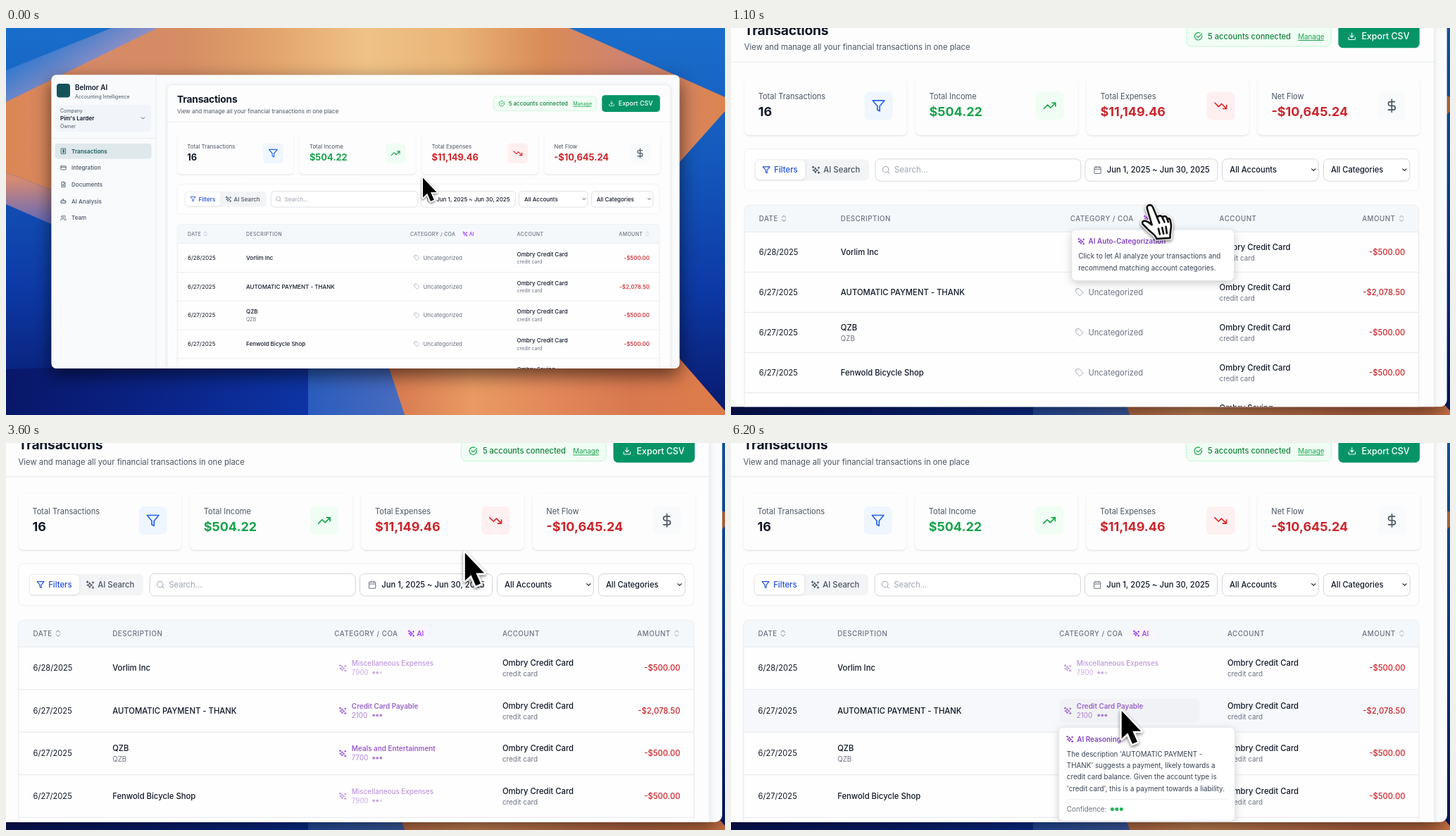
An HTML page with a canvas for the animation above (6.3 s loop, 1021x549 px).

```html
<!DOCTYPE html>
<html lang="en">
<head>
<meta charset="utf-8">
<title>Transactions demo</title>
<style>
html, body { margin: 0; width: 100%; height: 100%; overflow: hidden; background: #0d3fa0; }
canvas { display: block; width: 1021px; height: 549px; }
</style>
</head>
<body>
<canvas id="stage" width="1021" height="549"></canvas>
<script>
const W = 1021, H = 549, LOOP = 6300;
const ctx = document.getElementById('stage').getContext('2d');

const INK = '#111827', MUTED = '#6b7280', LINE = '#e5e7eb', RED = '#c9252b', GREEN = '#16a34a', PURPLE = '#9333ea';

// Icons on a 24-unit grid
const ICON = {
  filter: 'M22 3H2l8 9.5V19l4 2v-8.5z',
  up: 'M22 7l-8.5 8.5-5-5L2 17M16 7h6v6',
  down: 'M22 17l-8.5-8.5-5 5L2 7M16 17h6v-6',
  dollar: 'M12 1v22M17 5H9.5a3.5 3.5 0 0 0 0 7h5a3.5 3.5 0 0 1 0 7H6',
  spark: 'M10 6l2 5 5 2-5 2-2 5-2-5-5-2 5-2zM4 2v5M1.5 4.5h5M19 4v4M17 6h4M19 17v5M16.5 19.5h5',
  search: 'M3 11a8 8 0 1 0 16 0a8 8 0 1 0-16 0M21 21l-4.3-4.3',
  calendar: 'M5 4h14a2 2 0 0 1 2 2v14a2 2 0 0 1-2 2H5a2 2 0 0 1-2-2V6a2 2 0 0 1 2-2zM16 2v4M8 2v4M3 10h18',
  tag: 'M12.6 2.6A2 2 0 0 0 11.2 2H4a2 2 0 0 0-2 2v7.2a2 2 0 0 0 .6 1.4l8.7 8.7a2.4 2.4 0 0 0 3.4 0l6.6-6.6a2.4 2.4 0 0 0 0-3.4zM7.5 7.5h.1',
  sort: 'M6 15l6 6 6-6M6 9l6-6 6 6',
  chevron: 'M5 8l7 7 7-7',
  check: 'M21.8 10A10 10 0 1 1 17 3.3M8 11l4 4L22 5',
  download: 'M21 15v4a2 2 0 0 1-2 2H5a2 2 0 0 1-2-2v-4M7 10l5 5 5-5M12 15V3',
  ledger: 'M4 2h16v20H4zM15 8h-5v4h5v4H9M12 6v12',
  card: 'M3 5h18a1 1 0 0 1 1 1v12a1 1 0 0 1-1 1H3a1 1 0 0 1-1-1V6a1 1 0 0 1 1-1zM2 10h20',
  file: 'M14 2H5v20h14V7zM14 2v5h5M8 12h8M8 16h8',
  bot: 'M4 9h16v11H4zM12 9V4H8M1 14h3M20 14h3M9 13v3M15 13v3',
  team: 'M5 7a4 4 0 1 0 8 0a4 4 0 1 0-8 0M2 21v-2a4 4 0 0 1 4-4h6a4 4 0 0 1 4 4v2M16 3a4 4 0 0 1 0 8M22 21v-2a4 4 0 0 0-3-4'
};

const ROWS = [
  { date: '6/28/2025', name: 'Vorlim Inc', amount: '-$500.00', category: 'Miscellaneous Expenses', code: '7900', tone: '#bd97dd', dots: 2 },
  { date: '6/27/2025', name: 'AUTOMATIC PAYMENT - THANK', amount: '-$2,078.50', category: 'Credit Card Payable', code: '2100', tone: '#9b63ca', dots: 3 },
  { date: '6/27/2025', name: 'QZB', sub: 'QZB', amount: '-$500.00', category: 'Meals and Entertainment', code: '7700', tone: '#9b5cc9', dots: 3 },
  { date: '6/27/2025', name: 'Fenwold Bicycle Shop', amount: '-$500.00', category: 'Miscellaneous Expenses', code: '7900', tone: '#bd97dd', dots: 2 }
];

// Column positions and row height for each table phase
const LAYOUT = {
  idle: { desc: 341, cat: 574, account: 725.5, row: 40.8 },
  loading: { desc: 342.6, cat: 580, account: 722, row: 40.8 },
  done: { desc: 338.4, cat: 563.4, account: 733.7, row: 43.2 }
};

const CLICK = 1600, RESULT = 3200, HOVER = 4870;

// Cursor stops: time, x, y
const STOPS = [
  [0, 591, 211], [700, 664.6, 218], [1100, 654, 277], [1650, 654, 279],
  [2200, 694.8, 209], [4150, 694.8, 209], [4720, 626, 428], [5140, 625.5, 369]
];

const clamp = v => Math.max(0, Math.min(1, v));
const smooth = u => u * u * (3 - 2 * u);

function text(str, x, y, size, weight = 400, color = INK, align = 'left', spacing = 0) {
  ctx.font = `${weight} ${size}px Inter, sans-serif`;
  ctx.letterSpacing = spacing + 'px';
  ctx.textAlign = align;
  ctx.fillStyle = color;
  ctx.fillText(str, x, y + size * 0.36);
}

function box(x, y, w, h, r, fill, stroke) {
  ctx.beginPath();
  ctx.roundRect(x, y, w, h, r);
  if (fill) { ctx.fillStyle = fill; ctx.fill(); }
  if (stroke) { ctx.strokeStyle = stroke; ctx.lineWidth = 0.7; ctx.stroke(); }
}

function shadowBox(x, y, w, h, r, fill, shade, blur, drop, zoom) {
  ctx.save();
  ctx.shadowColor = shade;
  ctx.shadowBlur = blur * zoom;
  ctx.shadowOffsetY = drop * zoom;
  box(x, y, w, h, r, fill);
  ctx.restore();
}

function icon(name, x, y, size, color, width = 2) {
  ctx.save();
  ctx.translate(x - size / 2, y - size / 2);
  ctx.scale(size / 24, size / 24);
  ctx.strokeStyle = color;
  ctx.lineWidth = width;
  ctx.lineCap = ctx.lineJoin = 'round';
  ctx.stroke(new Path2D(ICON[name]));
  ctx.restore();
}

function rule(x1, x2, y, color = LINE) {
  ctx.fillStyle = color;
  ctx.fillRect(x1, y - 0.35, x2 - x1, 0.7);
}

function dots(x, y, count, color, step, r) {
  for (let i = 0; i < 3; i++) {
    ctx.globalAlpha *= i < count ? 1 : 0.5;
    ctx.fillStyle = color;
    ctx.beginPath();
    ctx.arc(x + i * step, y, r, 0, 7);
    ctx.fill();
  }
}

function gradient(x1, y1, x2, y2, colors) {
  const g = ctx.createLinearGradient(x1, y1, x2, y2);
  colors.forEach((c, i) => g.addColorStop(i / (colors.length - 1), c));
  return g;
}

function shape(points, fill) {
  ctx.beginPath();
  points.forEach(([x, y]) => ctx.lineTo(x, y));
  ctx.closePath();
  ctx.fillStyle = fill;
  ctx.fill();
}

function wallpaper() {
  ctx.fillStyle = gradient(0, 0, 0, H, ['#1a6ecb', '#1459bb', '#0d3aa6', '#08196c']);
  ctx.fillRect(0, 0, W, H);
  shape([[0, 60], [150, 0], [225, 0], [0, 108]], gradient(40, 30, 75, 85, ['#2f78cf', '#8b8fc4']));
  // Orange crown reaching down to a tip on either side
  shape([[215, 0], [800, 0], [1021, 98], [1021, 118], [930, 220], [510, 290], [80, 235], [0, 205], [0, 105]],
    gradient(0, 0, W, 0, ['#dc8655', '#d68a68', '#d58d63', '#e3a56d', '#efc287', '#e9b477', '#da8b58', '#cd8270', '#dd8550']));
  shape([[0, 205], [80, 235], [80, 285], [0, 250]], gradient(0, 215, 0, 270, ['#d58a72', '#6f6db5']));
  shape([[0, 484], [429, 470], [429, H], [0, H]], gradient(0, 0, 429, 0, ['#081768', '#0a2387', '#0d34a4']));
  shape([[429, 470], [545, 470], [566, H], [429, H]], gradient(429, 0, 566, 0, ['#2a5cbd', '#4a6cbf']));
  shape([[540, 470], [940, 450], [1021, 543], [1021, H], [566, H]],
    gradient(550, 0, 1000, 0, ['#d77a51', '#ea9a62', '#e3885a', '#d8784f', '#dd7c4b']));
}

function sidebar() {
  box(64.5, 66.5, 149, 416.5, [7, 0, 0, 7], '#f8fafc');
  ctx.fillStyle = LINE;
  ctx.fillRect(213.3, 66.5, 0.7, 416.5);
  box(72, 79, 19, 19.5, 4, '#15535a');
  text('Belmor AI', 98, 84.5, 9.9, 600);
  text('Accounting Intelligence', 98, 97.5, 7, 400, '#4b5563');
  box(70, 109, 136, 38, 5, '#f1f5f9');
  text('Company', 77, 117.5, 7, 400, '#4b5563');
  text("Pim's Larder", 77, 128, 8, 600);
  text('Owner', 77, 139, 7, 400, '#4b5563');
  icon('chevron', 194.5, 128, 8, '#374151', 2.4);
  rule(64.5, 213.5, 156.5);
  box(69.5, 164, 137, 21.5, 4, '#dfe8ea');
  [['ledger', 'Transactions'], ['card', 'Integration'], ['file', 'Documents'], ['bot', 'AI Analysis'], ['team', 'Team']]
    .forEach(([glyph, label], i) => {
      const y = 174.7 + i * 23.65, color = i ? '#4b5563' : '#155e63';
      icon(glyph, 81.5, y, 8.8, color, 2.2);
      text(label, 93, y, 8.1, i ? 500 : 600, color);
    });
}

function header() {
  text('Transactions', 243, 100.8, 13.8, 700, INK, 'left', -0.2);
  text('View and manage all your financial transactions in one place', 243, 118.1, 8.05, 400, '#4b5563');
  box(692, 97, 147, 20.5, 5, '#f0fdf4', '#c6f3d5');
  icon('check', 704, 107.2, 9, GREEN, 2.2);
  text('5 accounts connected', 713.7, 107.2, 7.95, 500, '#15803d');
  text('Manage', 805.3, 107.4, 7, 400, GREEN);
  rule(805.3, 831.5, 111.3, GREEN);
  box(846.2, 95.2, 82.5, 23.7, 4.5, '#069467');
  icon('download', 860, 107.2, 9, '#fff');
  text('Export CSV', 869.8, 107.2, 8.9, 500, '#fff');
  rule(229, 943.4, 133.2);
}

function cards(zoom) {
  [
    ['Total Transactions', '16', INK, 'filter', '#2563eb', '#eff6ff'],
    ['Total Income', '$504.22', GREEN, 'up', GREEN, '#f0fdf4'],
    ['Total Expenses', '$11,149.46', RED, 'down', '#dc2626', '#feeff0'],
    ['Net Flow', '-$10,645.24', RED, 'dollar', '#4b5563', '#f8fafc']
  ].forEach(([label, value, color, glyph, tint, tile], i) => {
    const x = 243.2 + i * 173.7;
    shadowBox(x, 150, 165, 57.5, 5, '#fdfdfd', 'rgba(0,0,0,.1)', 1.5, 0.9, zoom);
    text(label, x + 14, 168.4, 7.9, 400, '#4b5563');
    text(value, x + 14, 183.8, 12.85, 700, color);
    box(x + 122, 163.5, 28.5, 28.5, 5, tile);
    icon(glyph, x + 136.2, 177.7, 14.2, tint);
  });
}

function filters(zoom) {
  const y = 242.7;
  box(243.2, 221.4, 684.7, 42.5, 5, '#fefefe', '#eceef0');
  box(254, 232, 115.7, 21.5, 4.5, '#f3f4f6');
  shadowBox(254.5, 232.7, 50.3, 20, 4, '#fff', 'rgba(0,0,0,.14)', 2, 0.5, zoom);
  icon('filter', 265.5, y, 8.5, '#1d4ed8', 2.3);
  text('Filters', 273.4, y, 8.1, 500, '#1d4ed8');
  icon('spark', 316, y, 9, '#4b5563', 2.3);
  text('AI Search', 323.4, y, 8.1, 500, '#4b5563');
  const field = (x1, x2) => box(x1, 231.6, x2 - x1, 22.5, 5, '#fff', '#d1d5db');
  field(376.2, 584.8);
  icon('search', 387, y, 9, '#9ca3af');
  text('Search...', 395.5, y, 8.1, 400, '#9ca3af');
  field(589.2, 723.5);
  icon('calendar', 601.8, y, 8.8, MUTED);
  text('Jun 1, 2025 ~ Jun 30, 2025', 611.2, y, 8, 500);
  field(728.4, 826);
  text('All Accounts', 736, y, 7.95, 500);
  icon('chevron', 821, y, 6.5, INK, 2.8);
  field(831.2, 918.8);
  text('All Categories', 838.7, y, 7.95, 500);
  icon('chevron', 913.4, y, 6.5, INK, 2.8);
}

function category(row, layout, phase, y, hovered) {
  if (phase !== 'done') {
    icon('tag', layout.cat + 9.3, y, 8.4, '#9ca3af');
    text('Uncategorized', layout.cat + 18.4, y, 8, 400, MUTED);
    return;
  }
  if (hovered) box(563.5, y - 11.8, 142, 23.5, 4, '#f1f2f5');
  icon('spark', 572, y, 8.3, row.tone, 2.3);
  text(row.category, 580.9, y - 4.6, 7.05, row.dots > 2 ? 600 : 500, row.tone);
  ctx.save();
  ctx.globalAlpha = 0.8;
  text(row.code, 580.9, y + 4.7, 7, 400, row.tone);
  dots(603.3, y + 4.7, row.dots, row.tone, 3.6, 1.35);
  ctx.restore();
}

function account(x, y, name) {
  text(name, x, y - 4.9, 8.05, 500);
  text('credit card', x, y + 6, 7.05, 400, MUTED);
}

function table(t, phase) {
  const layout = LAYOUT[phase], top = 305.6, left = 243.2, right = 927.9;
  const label = (s, x, align) => text(s, x, 292, 7, 500, MUTED, align, 0.35);
  box(left, 278.5, right - left, 230, 5, '#fefefe', LINE);
  box(left + 0.3, 278.8, right - left - 0.6, top - 278.8, [5, 5, 0, 0], '#f5f8fb');
  rule(left, right, top);
  label('DATE', 258);
  icon('sort', 283.2, 292, 8, '#9ca3af', 2.2);
  label('DESCRIPTION', layout.desc);
  label('CATEGORY / COA', layout.cat);
  label('ACCOUNT', layout.account);
  label('AMOUNT', 904.2, 'right');
  icon('sort', 910.4, 292, 8, '#b6bcc5', 2.2);

  if (phase === 'loading') {
    const turn = (t - 2300) / 1000 * Math.PI * 2;
    ctx.strokeStyle = '#b98bdd';
    ctx.lineWidth = 1.1;
    ctx.beginPath();
    ctx.arc(layout.cat + 79, 292, 4.3, turn + Math.PI, turn + Math.PI * 1.5);
    ctx.stroke();
  } else {
    box(layout.cat + 72.5, 285.8, 24, 12.4, 3, '#faf5ff');
    icon('spark', layout.cat + 78, 292, 7.2, PURPLE, 2.6);
    text('AI', layout.cat + 83.7, 292, 7, 500, PURPLE);
  }

  ROWS.forEach((row, i) => {
    const rowTop = top + i * layout.row, y = rowTop + layout.row / 2 - 0.1;
    const hovered = i === 1 && t >= HOVER - 70;
    if (hovered) {
      ctx.fillStyle = '#f6f8fb';
      ctx.fillRect(left + 0.4, rowTop + 0.3, right - left - 0.8, layout.row - 0.6);
    }
    rule(left, right, rowTop + layout.row);
    text(row.date, 258, y, 7.95);
    if (row.sub) {
      text(row.name, layout.desc, y - 4.9, 8.05, 500);
      text(row.sub, layout.desc, y + 5.9, 7, 400, MUTED);
    } else text(row.name, layout.desc, y, 8.05, 500);
    category(row, layout, phase, y, hovered);
    account(layout.account, y, 'Ombry Credit Card');
    text(row.amount, 914, y, 8.05, 500, RED, 'right');
  });
  account(layout.account, top + layout.row * 4.5, 'Ombry Saving');
}

function popover(x, y, w, h, title, lines, pitch, alpha, zoom, extra) {
  if (alpha <= 0) return;
  ctx.save();
  ctx.globalAlpha = alpha;
  ctx.translate(0, (alpha - 1) * 2.3);
  shadowBox(x, y, w, h, 4.5, '#fff', 'rgba(0,0,0,.2)', 8, 2.5, zoom);
  box(x, y, w, h, 4.5, null, LINE);
  const inset = x + (extra ? 8.2 : 6.7);
  icon('spark', inset + 3.2, y + 12, 7.8, '#8b3fd0', 2.4);
  text(title, inset + 10.3, y + 12, 7.05, 600, '#8344c0');
  lines.forEach((line, i) => text(line, inset, y + 27 + i * pitch, 7, 400, '#374151'));
  if (extra) extra(inset);
  ctx.restore();
}

function popovers(t, zoom) {
  popover(575.5, 303.2, 165, 51.7, 'AI Auto-Categorization',
    ['Click to let AI analyze your transactions and', 'recommend matching account categories.'],
    11.8, t < CLICK ? clamp((t - 930) / 130) : 0, zoom);
  popover(562.7, 387, 178.5, 95, 'AI Reasoning', [
    "The description 'AUTOMATIC PAYMENT -", "THANK' suggests a payment, likely towards a",
    'credit card balance. Given the account type is', "'credit card', this is a payment towards a liability."
  ], 11.7, clamp((t - HOVER) / 150), zoom, x => {
    rule(x, 733, 460, '#eef0f2');
    text('Confidence:', x, 470, 7, 400, MUTED);
    dots(617, 470, 3, '#22b45c', 4.6, 1.8);
  });
}

function cursorAt(t) {
  const i = STOPS.findIndex(s => s[0] > t);
  if (i < 0) return STOPS[STOPS.length - 1].slice(1);
  const [t0, x0, y0] = STOPS[i - 1], [t1, x1, y1] = STOPS[i];
  const u = smooth((t - t0) / (t1 - t0));
  return [x0 + (x1 - x0) * u, y0 + (y1 - y0) * u];
}

function cursor(t, zoom) {
  const [x, y] = cursorAt(t);
  const hand = t > 950 && t < 1720;
  const path = new Path2D(hand
    ? 'M-3 4C-4 0 1-2 3 2L8 14C8 11 12 10 13.5 13.5C14 11 18 11 18.5 15C20 13 22 15 22 18C24 24 21 27 21.5 35L7 36C6 31 0 29-4 24L-8 20C-9 16-5 15 2 21Z'
    : 'M0 0V29.5L6.5 23.5L11.5 35L16.7 32.8L11.7 21.5H20.5Z');
  ctx.save();
  ctx.translate(x + 1, y + 1.5);
  ctx.scale(0.95, 0.95);
  ctx.lineJoin = ctx.lineCap = 'round';
  ctx.shadowColor = 'rgba(0,0,0,.5)';
  ctx.shadowBlur = 3 * zoom;
  ctx.shadowOffsetY = 1.5 * zoom;
  ctx.strokeStyle = '#fff';
  ctx.lineWidth = 4;
  ctx.stroke(path);
  ctx.shadowColor = 'transparent';
  ctx.fillStyle = hand ? '#fff' : '#000';
  ctx.fill(path);
  if (hand) {
    ctx.strokeStyle = '#111';
    ctx.lineWidth = 2;
    ctx.stroke(path);
    ctx.stroke(new Path2D('M8 14l2 5M13.5 14l2 4M18.5 15l1 3M9 25l1.5 6M13 24l1.5 6.5M17 23l1 7'));
  }
  ctx.restore();
}

// Critically damped zoom toward the table
function zoomProgress(t) {
  const k = Math.max(0, t - 150) / 1000 * 7.72;
  return 1 - (1 + k) * Math.exp(-k);
}

function draw(t) {
  const p = zoomProgress(t), zoom = 1 + 0.4007 * p;
  ctx.setTransform(1, 0, 0, 1, 0, 0);
  wallpaper();
  ctx.setTransform(zoom, 0, 0, zoom, -322.8 * p, -138.9 * p);
  shadowBox(64.5, 66.5, 892, 416.5, 7, '#fafbfc', 'rgba(0,0,0,.6)', 26, 9, zoom);
  ctx.save();
  ctx.beginPath();
  ctx.roundRect(64.5, 66.5, 892, 416.5, 7);
  ctx.clip();
  sidebar();
  shadowBox(229, 80.7, 714.4, 430, 7, '#fdfdfd', 'rgba(0,0,0,.12)', 5, 0.5, zoom);
  box(229, 80.7, 714.4, 430, 7, null, '#eceef1');
  header();
  cards(zoom);
  filters(zoom);
  table(t, t < CLICK ? 'idle' : t < RESULT ? 'loading' : 'done');
  popovers(t, zoom);
  ctx.restore();
  cursor(t, zoom);
}

function frame() {
  draw(performance.now() % LOOP);
  requestAnimationFrame(frame);
}
frame();
</script>
</body>
</html>
```
